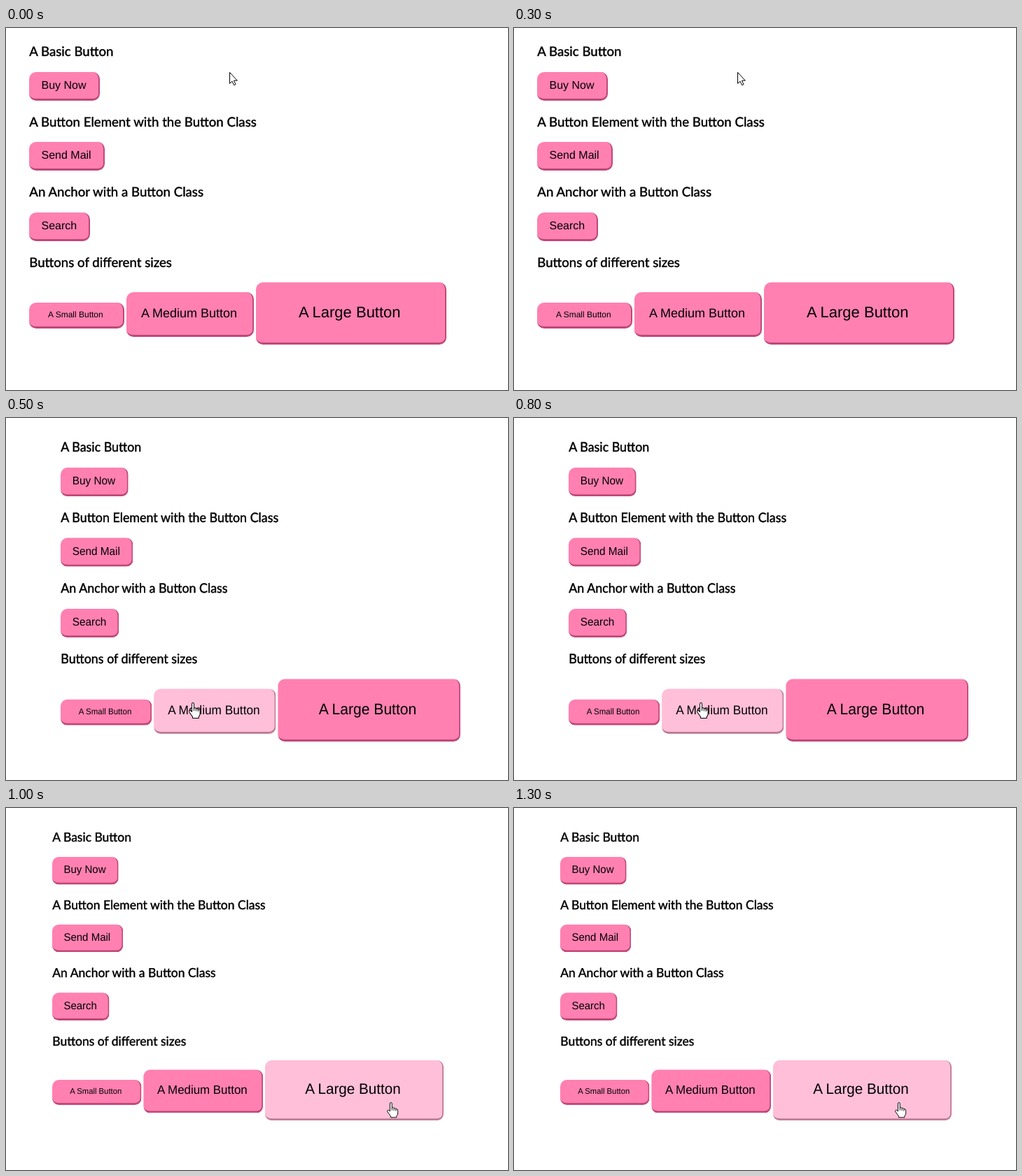
These frames come from a looping animation (717x518 px, 1.5 s). An HTML page:

```html
<!DOCTYPE html>
<html lang="en">
<head>
<meta charset="utf-8">
<title>Button styles</title>
<style>
html, body { margin: 0; width: 100%; height: 100%; overflow: hidden; background: #fff; }
#stage { position: relative; width: 717px; height: 518px; overflow: hidden; background: #fff; }
#page { position: absolute; inset: 0; transform-origin: 0 0; }
svg { position: absolute; left: 0; top: 0; overflow: visible; }
text { text-rendering: geometricPrecision; }
.btn {
  position: absolute; box-sizing: border-box; border: 0 solid #bf4878;
  border-width: 0 2px 3px 0; border-radius: 10px; background: #ff80b1;
}
.btn.hover { background: #ffbfd8; border-color: #bf7c97; }
.head { font-family: Lato, sans-serif; font-size: 18.65px; stroke: #000; stroke-width: .45px; }
.label { font-family: "Liberation Sans", Arial, sans-serif; }
</style>
</head>
<body>
<div id="stage">
  <div id="page"><svg id="text" width="717" height="518"></svg></div>
  <svg width="717" height="518" fill="#fff" stroke="#000" stroke-linejoin="round">
    <path id="arrow" d="M.5.5V16.5L4 13.2 6.6 18.8 9 17.7 6.5 12.2H11.3Z"/>
    <g id="hand">
      <path d="M-2 13V1.5Q-2 0-.5 0T1 1.5V7.5Q3.5 6.5 4 8.5Q6.5 7.5 7 9.5Q10 9 10 12V16Q10 18 8 20V22H-1V20L-5.5 14Q-7 11.5-5 11Q-3.5 11-2 13Z"/>
      <path d="M1 7.5V11.5M4 8.5V12M7 9.5V12.5" fill="none"/>
    </g>
  </svg>
</div>
<script>
const $ = id => document.getElementById(id);
const page = $('page'), text = $('text');
const ORIGIN = { x: 33, y: 63 };

function addText(str, x, y, cls, size) {
  const t = document.createElementNS('http://www.w3.org/2000/svg', 'text');
  t.setAttribute('x', x);
  t.setAttribute('y', y);
  t.setAttribute('class', cls);
  if (size) t.setAttribute('font-size', size);
  t.textContent = str;
  text.append(t);
}

function addButton(str, x, y, w, h, textX, baseline, size) {
  const b = document.createElement('div');
  b.className = 'btn';
  Object.assign(b.style, { left: x + 'px', top: y + 'px', width: w + 'px', height: h + 'px' });
  page.insertBefore(b, text);
  addText(str, textX, baseline, 'label', size);
  return b;
}

['A Basic Button', 'A Button Element with the Button Class',
 'An Anchor with a Button Class', 'Buttons of different sizes']
  .forEach((s, i) => addText(s, 33.3, 40 + i * 100.6, 'head'));

addButton('Buy Now', 33, 63, 101, 41, 50.5, 87, 16);
addButton('Send Mail', 33, 163, 108, 41, 50.5, 187, 16);
addButton('Search', 33, 264, 87, 41, 50.5, 288, 16);
addButton('A Small Button', 33, 393, 136, 37, 60, 414, 12);
const medium = addButton('A Medium Button', 172, 378, 182, 64, 193, 414, 18);
const large = addButton('A Large Button', 357, 364, 272, 89, 418, 414, 22);

// Each step: page corner and zoom, hovered button, pointer position
const steps = [
  { x: 33, y: 63, sx: 1, sy: 1, over: null, px: 319, py: 63 },
  { x: 78, y: 71, sx: .958, sy: 1.005, over: medium, px: 267.5, py: 407.5 },
  { x: 66, y: 70, sx: .938, sy: .967, over: large, px: 550.3, py: 421.5 }
];
const STEP = 500;
let shown = null;

function render(ms) {
  const s = steps[Math.floor(ms / STEP) % steps.length];
  if (s === shown) return;
  shown = s;
  page.style.transform =
    `matrix(${s.sx},0,0,${s.sy},${s.x - ORIGIN.x * s.sx},${s.y - ORIGIN.y * s.sy})`;
  for (const b of [medium, large]) b.classList.toggle('hover', b === s.over);
  const pointer = s.over ? $('hand') : $('arrow');
  $('arrow').style.display = s.over ? 'none' : '';
  $('hand').style.display = s.over ? '' : 'none';
  pointer.setAttribute('transform', `translate(${s.px} ${s.py}) scale(${s.sx} ${s.sy})`);
}

const start = performance.now();
function tick() {
  render(performance.now() - start);
  requestAnimationFrame(tick);
}
tick();
</script>
</body>
</html>
```
